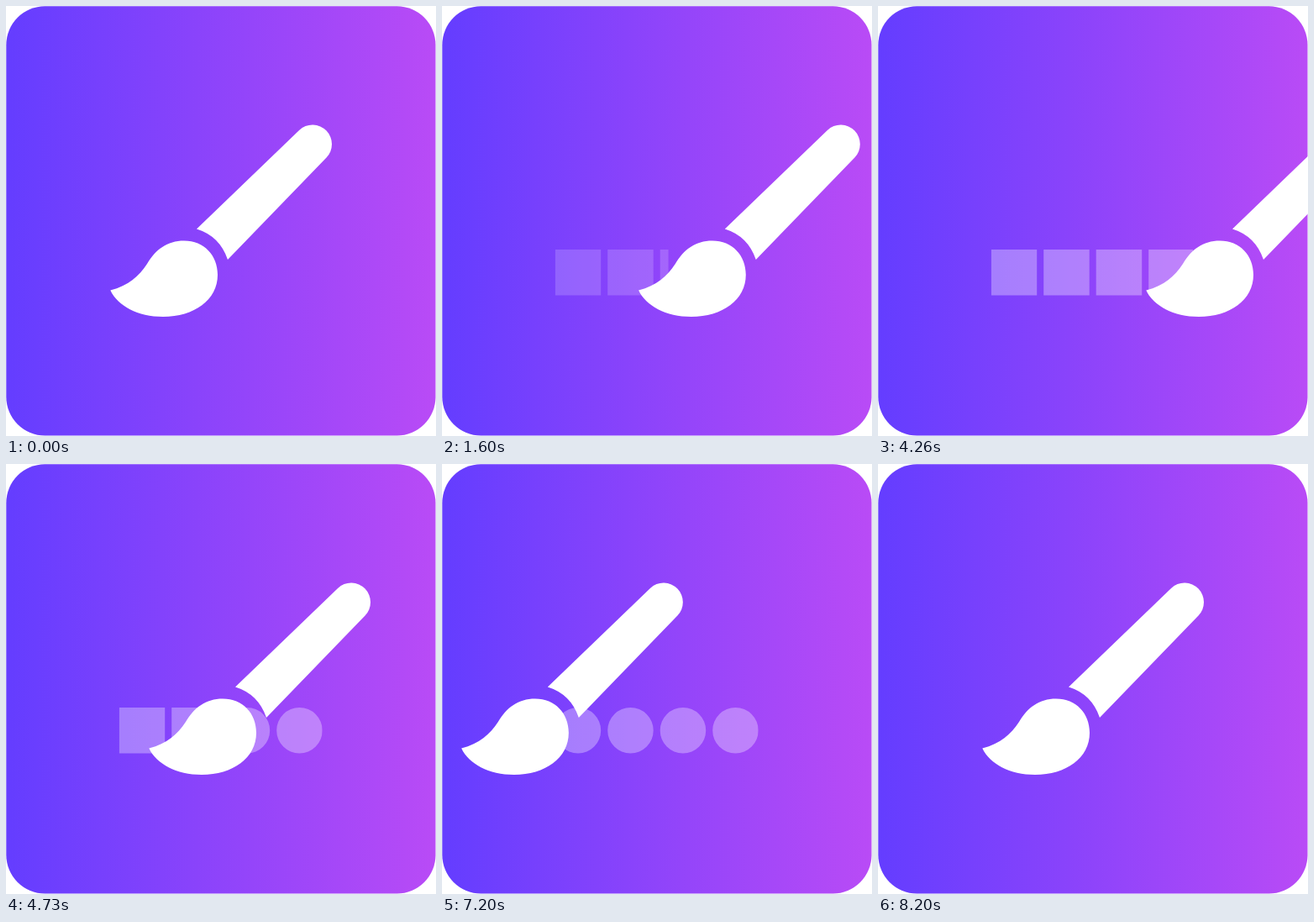
An HTML page with a canvas that plays this animation: 512 px wide and 512 px high, repeating every 9460 ms.

```html
<!DOCTYPE html>
<html lang="en">
<head>
<meta charset="utf-8">
<title>Brush</title>
<style>
  html, body { margin: 0; width: 100%; height: 100%; overflow: hidden; background: #fff; }
  canvas { display: block; width: 100vw; height: 100vh; }
</style>
</head>
<body>
<canvas id="stage" width="512" height="512"></canvas>
<script>
const ctx = document.getElementById('stage').getContext('2d');
const LOOP = 9460, STEP = 1000 / 15, MOVE = 1050;
const STARTS = [1040, 4205, 7145];
const STOPS = [0, 197, -101.7, 0];
const ROW = { x: 134.7, y: 290, size: 54.5, pitch: 62.5, count: 4, alpha: 0.32 };
const ROW_WIDTH = ROW.pitch * (ROW.count - 1) + ROW.size;

const sky = ctx.createLinearGradient(0, 0, 512, 0);
sky.addColorStop(0, '#643dff');
sky.addColorStop(1, '#b94bf6');

// cubic-bezier(.42, 0, .58, 1)
function ease(x) {
  if (x <= 0) return 0;
  if (x >= 1) return 1;
  let lo = 0, hi = 1, u = 0.5;
  for (let i = 0; i < 24; i++) {
    u = (lo + hi) / 2;
    const bx = 3 * (1 - u) * u * (0.42 * (1 - u) + 0.58 * u) + u ** 3;
    if (bx < x) lo = u; else hi = u;
  }
  return u * u * (3 - 2 * u);
}

function drawCard() {
  ctx.fillStyle = '#fff';
  ctx.fillRect(0, 0, 512, 512);
  ctx.fillStyle = sky;
  ctx.beginPath();
  ctx.roundRect(0.3, 0.3, 511.2, 511.2, 46);
  ctx.fill();
}

// One row of shapes, visible between left and right (fractions of the row).
function drawRow(radius, left, right, alpha) {
  if (right <= left || alpha <= 0) return;
  ctx.save();
  ctx.beginPath();
  ctx.rect(ROW.x + left * ROW_WIDTH, ROW.y - 2, (right - left) * ROW_WIDTH, ROW.size + 4);
  ctx.clip();
  ctx.fillStyle = `rgba(255, 255, 255, ${ROW.alpha * alpha})`;
  ctx.beginPath();
  for (let i = 0; i < ROW.count; i++) {
    ctx.roundRect(ROW.x + i * ROW.pitch, ROW.y, ROW.size, ROW.size, radius);
  }
  ctx.fill();
  ctx.restore();
}

function drawBrush(dx) {
  ctx.save();
  ctx.translate(dx, 0);
  ctx.fillStyle = '#fff';

  ctx.beginPath();
  ctx.moveTo(227, 265.5);
  ctx.arc(365, 164.5, 23, -2.337, 0.768);
  ctx.lineTo(264, 302);
  ctx.quadraticCurveTo(254.5, 274, 227, 265.5);
  ctx.fill();

  ctx.beginPath();
  ctx.moveTo(124.3, 338.5);
  ctx.bezierCurveTo(146, 333, 158, 322, 168, 307);
  ctx.bezierCurveTo(178, 290, 192, 279.5, 212, 279.5);
  ctx.bezierCurveTo(236, 279.5, 252, 297, 252, 320);
  ctx.bezierCurveTo(252, 350, 224, 370, 187, 370);
  ctx.bezierCurveTo(157, 370, 133, 357, 124.3, 338.5);
  ctx.fill();
  ctx.restore();
}

function draw(time) {
  const t = Math.floor((time % LOOP + 6.7) / STEP) * STEP;
  const [show, swap, fade] = STARTS.map(start => ease((t - start) / MOVE));
  const dx = [show, swap, fade].reduce((sum, p, i) => sum + p * (STOPS[i + 1] - STOPS[i]), 0);

  drawCard();
  drawRow(0, 0, show * (1 - swap), show);
  drawRow(ROW.size / 2, 1 - swap, 1, 1 - fade);
  drawBrush(dx);
}

function tick() {
  draw(performance.now());
  requestAnimationFrame(tick);
}
tick();
</script>
</body>
</html>
```
